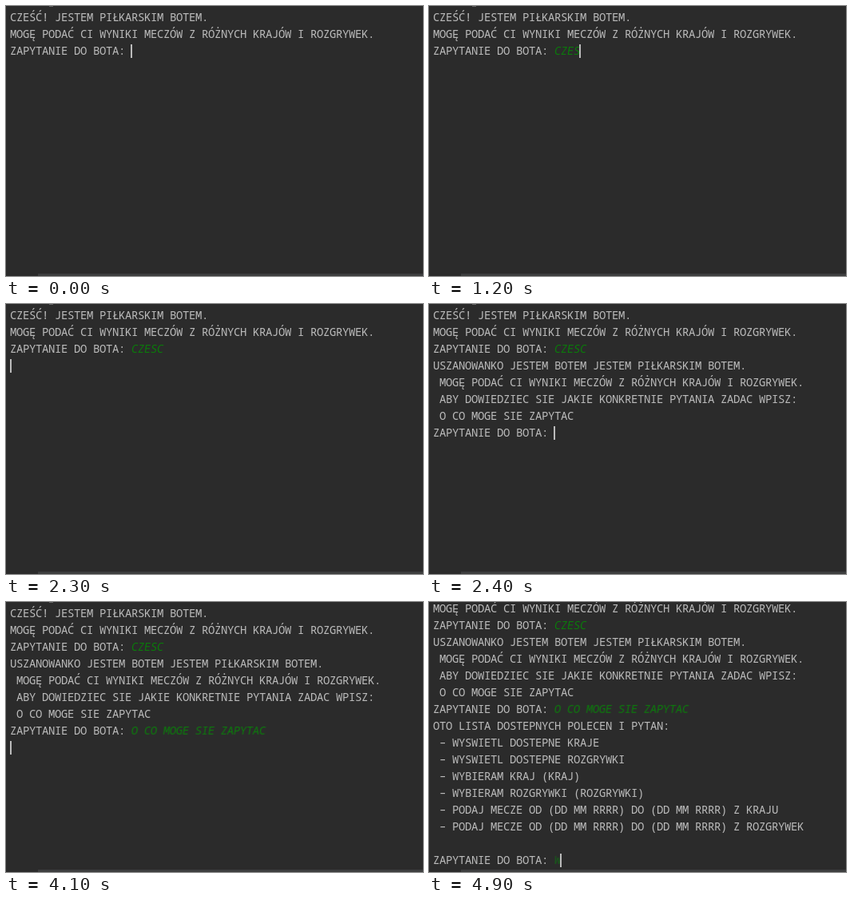
Recreate the animation shown at these times as an HTML page. Size 522 by 338 pixels, loop 5 s.

```html
<!DOCTYPE html>
<html lang="pl">
<head>
<meta charset="utf-8">
<title>Bot w terminalu</title>
<style>
  html, body { margin: 0; width: 100%; height: 100%; overflow: hidden; background: #2b2b2b; }
  .stage { position: relative; width: 522px; height: 338px; overflow: hidden; background: #2b2b2b; }
  .screen { position: absolute; inset: 0; }
  pre {
    position: absolute; left: 5px; top: 3px; margin: 0;
    font: 14px/21px "Noto Sans Mono", "DejaVu Sans Mono", monospace;
    letter-spacing: -.4px; font-variant-ligatures: none; color: #bbb;
  }
  i { display: inline-block; vertical-align: top; font-style: normal; transform: skewX(-9deg); color: #0b7a0b; }

  .screen, .caret, .greeting, .question, .reply, .list, .next {
    animation: 5s step-end -20ms infinite;
  }
  .screen { animation-name: scroll; }
  .greeting { animation-name: type; }
  .reply { animation-name: reply; }
  .question { animation-name: paste; }
  .list { animation-name: list; }
  .next { animation-name: next; color: #156018; }
  .caret {
    position: absolute; left: 0; top: 0; width: 2px; height: 17px;
    background: #bbb; animation-name: caret;
  }
  /* remains of the line above and the scroll bar */
  .descender { position: absolute; left: 54px; top: 0; width: 5px; height: 1px; background: #666; }
  .bar { position: absolute; left: 40px; right: 0; top: 335px; height: 3px; background: #3d3e3f; }

  @keyframes scroll { 0% { transform: none } 86%, to { transform: translateY(-27px) } }
  @keyframes reply { 0% { opacity: 0 } 48%, to { opacity: 1 } }
  @keyframes paste { 0% { opacity: 0 } 66%, to { opacity: 1 } }
  @keyframes list { 0% { opacity: 0 } 86%, to { opacity: 1 } }
  @keyframes next { 0% { opacity: 0 } 98%, to { opacity: 1 } }
  @keyframes type {
    0% { clip-path: inset(0 100% 0 0) }
    14% { clip-path: inset(0 32px 0 -2px) }
    18% { clip-path: inset(0 24px 0 -2px) }
    20% { clip-path: inset(0 16px 0 -2px) }
    24% { clip-path: inset(0 8px 0 -2px) }
    26%, to { clip-path: inset(0 -4px 0 -2px) }
  }
  @keyframes caret {
    0% { transform: translate(156px, 48px); opacity: 1 }
    6% { transform: translate(156px, 48px); opacity: 0 }
    14% { transform: translate(164px, 48px); opacity: 1 }
    18% { transform: translate(172px, 48px); opacity: 1 }
    20% { transform: translate(180px, 48px); opacity: 1 }
    24% { transform: translate(188px, 48px); opacity: 1 }
    26% { transform: translate(196px, 48px); opacity: 1 }
    36% { transform: translate(196px, 48px); opacity: 0 }
    44% { transform: translate(5px, 69px); opacity: 1 }
    48% { transform: translate(156px, 153px); opacity: 1 }
    54% { transform: translate(156px, 153px); opacity: 0 }
    66% { transform: translate(324px, 153px); opacity: 1 }
    76% { transform: translate(324px, 153px); opacity: 0 }
    80% { transform: translate(5px, 174px); opacity: 1 }
    86% { transform: translate(156px, 342px); opacity: 1 }
    90% { transform: translate(156px, 342px); opacity: 0 }
    98%, to { transform: translate(164px, 342px); opacity: 1 }
  }
</style>
</head>
<body>
<div class="stage">
  <div class="screen">
    <div class="descender"></div>
    <pre>CZEŚĆ! JESTEM PIŁKARSKIM BOTEM.
MOGĘ PODAĆ CI WYNIKI MECZÓW Z RÓŻNYCH KRAJÓW I ROZGRYWEK.
ZAPYTANIE DO BOTA: <i class="greeting">CZESC</i>
<span class="reply">USZANOWANKO JESTEM BOTEM JESTEM PIŁKARSKIM BOTEM.
 MOGĘ PODAĆ CI WYNIKI MECZÓW Z RÓŻNYCH KRAJÓW I ROZGRYWEK.
 ABY DOWIEDZIEC SIE JAKIE KONKRETNIE PYTANIA ZADAC WPISZ:
 O CO MOGE SIE ZAPYTAC
ZAPYTANIE DO BOTA: </span><i class="question">O CO MOGE SIE ZAPYTAC</i>
<span class="list">OTO LISTA DOSTEPNYCH POLECEN I PYTAN:
 – WYSWIETL DOSTEPNE KRAJE
 – WYSWIETL DOSTEPNE ROZGRYWKI
 – WYBIERAM KRAJ (KRAJ)
 – WYBIERAM ROZGRYWKI (ROZGRYWKI)
 – PODAJ MECZE OD (DD MM RRRR) DO (DD MM RRRR) Z KRAJU
 – PODAJ MECZE OD (DD MM RRRR) DO (DD MM RRRR) Z ROZGRYWEK

ZAPYTANIE DO BOTA: </span><i class="next">W</i></pre>
    <div class="caret"></div>
  </div>
  <div class="bar"></div>
</div>
</body>
</html>
```
